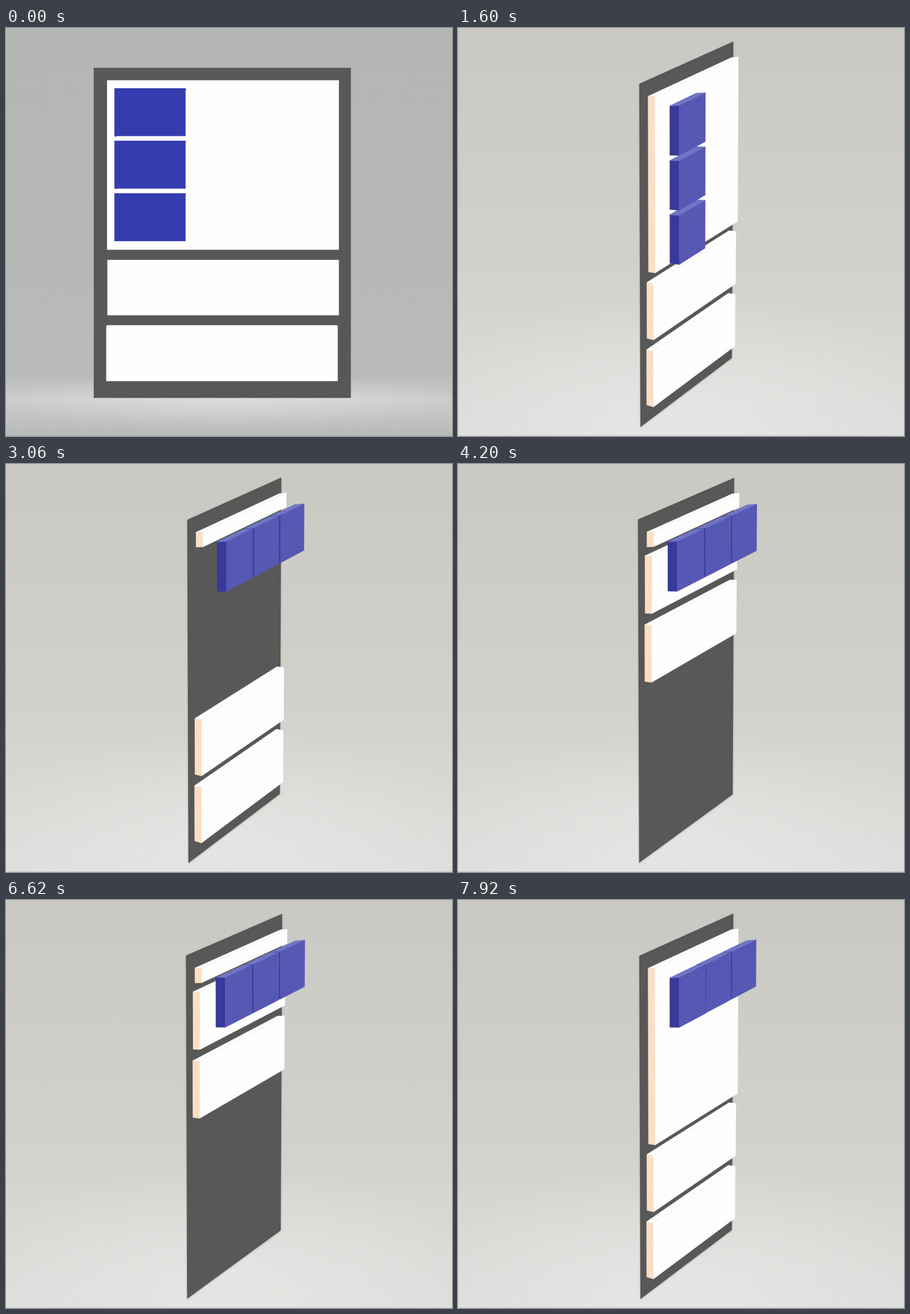
Recreate the animation shown at these times as an HTML page with a canvas. Size 782 px wide and 716 px high, loop 8 s.

```html
<!DOCTYPE html>
<html lang="en">
<head>
<meta charset="utf-8">
<title>Layout boxes</title>
<style>
html, body { margin: 0; width: 100%; height: 100%; overflow: hidden; background: #c9c8c2; }
canvas { display: block; }
</style>
</head>
<body>
<canvas id="stage" width="782" height="716"></canvas>
<script>
const W = 782, H = 716, LOOP = 8000;
const ctx = document.getElementById('stage').getContext('2d');

// The board as seen from the front; depth z grows towards the viewer.
const BOARD = { x: 154, y: 70, w: 450.5, h: 579 };
const CX = W / 2, CY = H / 2, NEAR = 0.0115;

const GREY = '#585858';
const WHITE = { front: '#fefefe', side: '#fbdfc4', top: '#fefefe' };

// A camera maps the board's corners (clockwise from top left) and a homogeneous depth step.
function camera(corners, depth, blue, frontal = false) {
  const [[x0, y0], [x1, y1], [x2, y2], [x3, y3]] = corners;
  const ax = x1 - x2, bx = x3 - x2, sx = x0 - x1 + x2 - x3;
  const ay = y1 - y2, by = y3 - y2, sy = y0 - y1 + y2 - y3;
  const det = ax * by - bx * ay;
  const g = (sx * by - bx * sy) / det, h = (ax * sy - sx * ay) / det;
  const [du, dv, dw] = depth;
  const project = (x, y, z) => {
    const s = (x - BOARD.x) / BOARD.w, t = (y - BOARD.y) / BOARD.h;
    const w = 1 + g * s + h * t + dw * z;
    return [
      (x0 + (x1 - x0 + g * x1) * s + (x3 - x0 + h * x3) * t + du * z) / w,
      (y0 + (y1 - y0 + g * y1) * s + (y3 - y0 + h * y3) * t + dv * z) / w
    ];
  };
  return { corners, depth, blue, frontal, project };
}

function mix(a, b, k) {
  const lerp = (p, q) => p.map((v, i) => v + (q[i] - v) * k);
  return camera(a.corners.map((p, i) => lerp(p, b.corners[i])), lerp(a.depth, b.depth), a.blue);
}

const right = BOARD.x + BOARD.w, bottom = BOARD.y + BOARD.h;
const front = camera(
  [[BOARD.x, BOARD.y], [right, BOARD.y], [right, bottom], [BOARD.x, bottom]],
  [-NEAR * CX, -NEAR * CY, -NEAR],
  { front: '#353cae', side: '#353cae', top: '#353cae' }, true);
const turned = camera(
  [[290, 92], [502, 30], [499, 588], [292, 694]], [14.5, -1.4, -0.008],
  { front: '#4448aa', side: '#333893', top: '#767ac3' });
const aside = camera(
  [[318, 98], [482.5, 24], [480, 579], [320, 700]], [13.4, -2.1, -0.0115],
  { front: '#5658b3', side: '#373a9a', top: '#7074c4' });
const tilted = mix(aside, turned, 0.08);

function poly(color, points) {
  ctx.fillStyle = ctx.strokeStyle = color;
  ctx.lineWidth = 0.4;
  ctx.beginPath();
  points.forEach(p => ctx.lineTo(...p));
  ctx.closePath();
  ctx.fill();
  ctx.stroke();
}

// x, y, w, h give the front face as the front camera shows it.
function slab(cam, x, y, w, h, z, thick, color) {
  const k = 1 - NEAR * z;
  const l = CX + (x - CX) * k, t = CY + (y - CY) * k;
  const r = l + w * k, b = t + h * k;
  const face = d => [[l, t], [r, t], [r, b], [l, b]].map(p => cam.project(...p, d));
  const f = face(z), back = face(z - thick);
  poly(color.side, [back[0], f[0], f[3], back[3]]);
  poly(color.top, [back[0], back[1], f[1], f[0]]);
  poly(color.front, f);
}

function fade(stops) {
  const g = ctx.createLinearGradient(0, 0, 0, H);
  stops.forEach(([at, color]) => g.addColorStop(at, color));
  ctx.fillStyle = g;
  ctx.fillRect(0, 0, W, H);
}

function glow(y, rx, ry, alpha) {
  ctx.save();
  ctx.translate(CX, y);
  ctx.scale(rx, ry);
  const g = ctx.createRadialGradient(0, 0, 0, 0, 0, 1);
  g.addColorStop(0, `rgba(255,255,255,${alpha})`);
  g.addColorStop(0.5, `rgba(255,255,255,${alpha * 0.55})`);
  g.addColorStop(1, 'rgba(255,255,255,0)');
  ctx.fillStyle = g;
  ctx.fillRect(-1, -1, 2, 2);
  ctx.restore();
}

function room(frontal) {
  if (frontal) {
    fade([[0, '#b4b6b4'], [0.5, '#b6b8b6'], [0.85, '#b9bbba'], [0.91, '#cbcccb'], [1, '#b8bab9']]);
    glow(654, 420, 48, 0.3);
  } else {
    fade([[0, '#c9c8c2'], [0.55, '#d1d1cb'], [0.75, '#d6d6d2'], [1, '#dddddb']]);
    glow(660, 480, 190, 0.28);
  }
  ctx.fillStyle = frontal ? '#a9abaa' : '#c6c6c5';
  ctx.fillRect(0, H - 1, W, 1);
}

function board(cam) {
  ctx.save();
  if (!cam.frontal) {
    ctx.shadowColor = 'rgba(0,0,0,0.2)';
    ctx.shadowBlur = 3;
    ctx.shadowOffsetY = 1;
  }
  poly(GREY, cam.corners);
  ctx.restore();
}

function draw({ cam, pulled, row, short, raised }) {
  room(cam.frontal);
  board(cam);
  const dx = raised ? -1 : 0, dy = raised ? -275.5 : 0;
  slab(cam, 177.5, 92, 406, short ? 25 : 297, 0.97, 0.69, WHITE);
  slab(cam, 178 + dx, 407.5 + dy, 405.5, 96.5, 0.8, 0.7, WHITE);
  slab(cam, 176 + dx, 523 + dy, 405.5, 96.5, 0.8, 0.7, WHITE);
  for (let i = 2; i >= 0; i--) {
    const [x, y] = row.includes(i) ? [186.8 + 131 * i, 105.5] : [190.5, 106 + 92.2 * i];
    slab(cam, x, y, 124.2, 83.5, pulled ? 2.98 : 1.88, 0.92, cam.blue);
  }
}

// Each step changes part of the state at once.
const steps = [
  [0, { cam: front, pulled: false, row: [], short: false, raised: false }],
  [810, { cam: turned }],
  [1020, { cam: aside }],
  [1600, { pulled: true }],
  [2260, { row: [1] }],
  [2560, { row: [1, 2] }],
  [3060, { row: [0, 1, 2], short: true }],
  [3540, { raised: true }],
  [4200, { cam: tilted }],
  [4360, { cam: front }],
  [6620, { cam: tilted }],
  [6780, { cam: aside }],
  [7440, { raised: false }],
  [7920, { row: [1, 2], short: false }]
];

const start = performance.now();
function tick() {
  const t = (performance.now() - start) % LOOP;
  const past = steps.filter(([at]) => at <= t).map(([, change]) => change);
  draw(Object.assign({}, ...past));
  requestAnimationFrame(tick);
}
tick();
</script>
</body>
</html>
```
